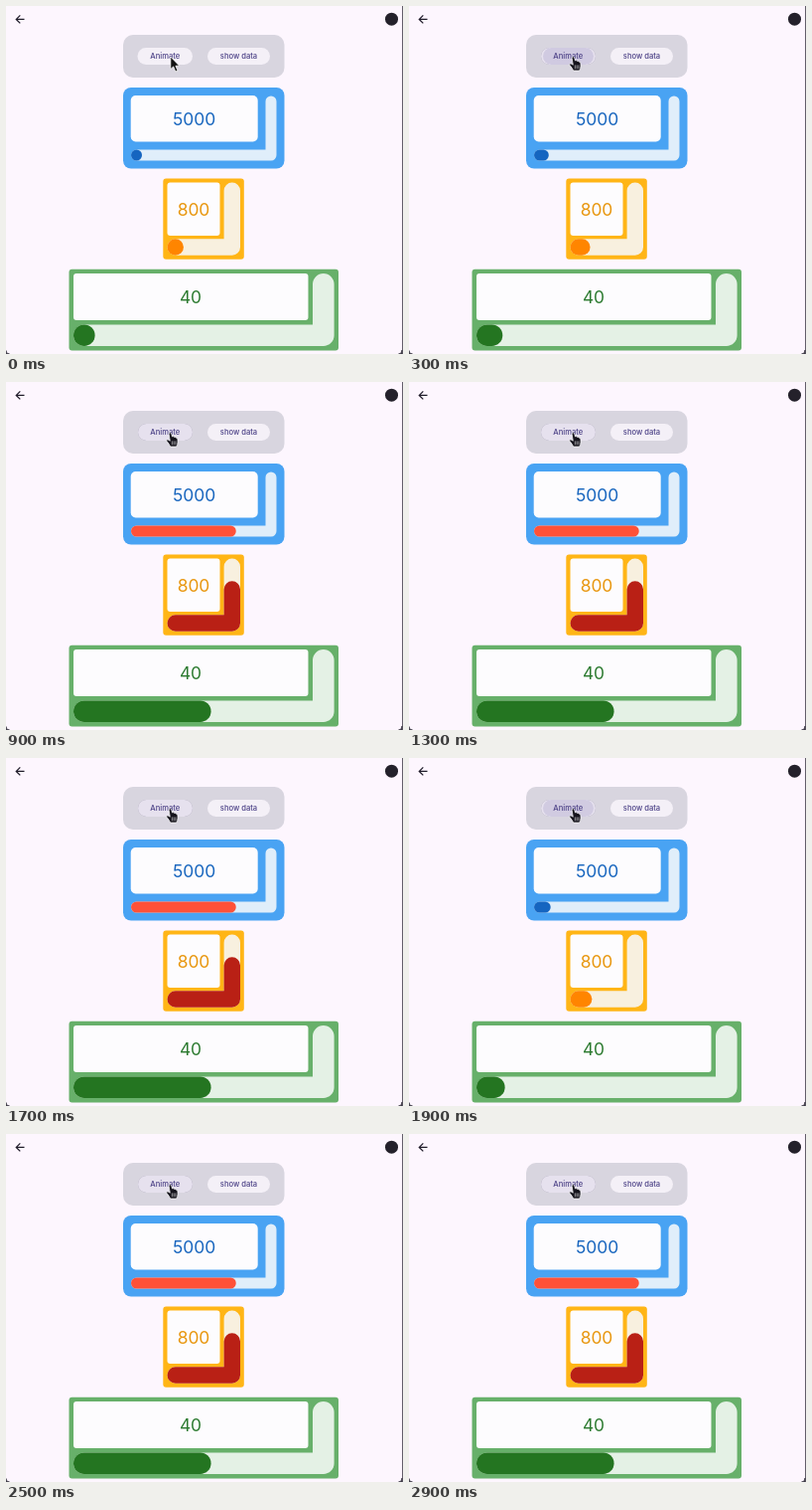
Recreate the animation shown at these times as an HTML page. Size 400 by 350 pixels, loop 3000 ms.

```html
<!DOCTYPE html>
<html lang="en">
<head>
<meta charset="utf-8">
<title>Animated level bars</title>
<style>
  html, body { margin: 0; width: 100%; height: 100%; overflow: hidden; background: #fdf6fe; }
  svg { display: block; width: 400px; height: 350px; }
  text { font-family: Inter, Roboto, sans-serif; text-anchor: middle; }
  .label { font-size: 7.6px; font-weight: 500; fill: #4b4086; }
  .value { font-size: 17.4px; }
  .track, .bar { fill: none; stroke-linecap: round; stroke-linejoin: round; }
  #hover { filter: drop-shadow(0 .8px .7px #77718c99); }
</style>
</head>
<body>
<svg viewBox="0 0 400 350">
  <path d="M399.5 0V350M0 346.5Q0 350 3.5 350H0ZM399 346Q399 350 395.5 350H399Z" fill="#3c3845" stroke="#3c3845" stroke-width=".8"/>
  <path d="M18.5 13.4H10.5M14.3 9.4L10.3 13.4L14.3 17.4" fill="none" stroke="#211d2b" stroke-width="1.3"/>
  <circle cx="388.5" cy="13.2" r="6.5" fill="#24212b"/>

  <rect x="118" y="29" width="162.5" height="43" rx="10" fill="#d8d5df"/>
  <rect x="132.5" y="42" width="55.5" height="17" rx="8.5" fill="#f4f0f7" id="idle"/>
  <g id="hover">
    <rect x="133" y="42" width="55" height="17" rx="8.5" fill="#e6e1ee"/>
    <rect x="135" y="42" width="51" height="17" rx="8.5" fill="#bfb9d8" id="ripple"/>
  </g>
  <rect x="203" y="42" width="63" height="17" rx="8.5" fill="#f4f0f7"/>
  <text class="label" x="160.3" y="53.2">Animate</text>
  <text class="label" x="234.5" y="53.2">show data</text>

  <g id="cards"></g>

  <path id="arrow" d="M165.8 51V63.6L168.7 60.9L170.8 66L173 65.1L170.9 60.2H174.7Z" fill="#111" stroke="#fff" stroke-width=".8"/>
  <g id="hand" stroke-linejoin="round" stroke-linecap="round">
    <path d="M164.2 51.5Q165.6 50 166.6 51.7L167.5 55Q169 54 169.7 55.5Q171 54.8 171.5 56.3Q173 56 173 58V60.5Q173 62.5 171.7 65H165.6Q164.6 62.4 162 59.6Q161 57.8 163 57.8L165 59Z" fill="#15131c" stroke="#fff" stroke-width=".7"/>
    <path d="M167.3 59.8V62.8M169.1 59.8V62.8M170.9 59.8V62.8" stroke="#eee" stroke-width=".6"/>
  </g>
</svg>
<script>
const LOOP = 3000, STEP = 100, DURATION = 500;
const CLICKS = [280, 1870];
const $ = id => document.getElementById(id);

// box and face: x, y, width, height, radius; track: left, bottom, right, top
const cards = [
  { box: [118, 82, 162.5, 81.5, 8], face: [125.7, 90, 128, 46.5, 5], track: [131.5, 150, 267, 96], width: 11,
    fill: '#49a3f3', rail: '#e0eefa', color: '#1565c0', alert: '#ff5138', alertAt: 40,
    level: 50, value: 5000, text: [189.6, 119.8], ink: '#1765be' },
  { box: [158.3, 173.5, 81.5, 81.2, 3], face: [162.5, 177.6, 53, 53.3, 3], track: [170.7, 242.5, 227.8, 185.7], width: 16.4,
    fill: '#ffb516', rail: '#f8f0df', color: '#ff8500', alert: '#b92015', alertAt: 50,
    level: 80, value: 800, text: [189, 210.8], ink: '#e8960d' },
  { box: [63.5, 264.7, 271.5, 81.8, 3], face: [68, 269, 236.5, 47, 3], track: [78.8, 331.2, 319.8, 279.8], width: 21.6,
    fill: '#67b06a', rail: '#e4f1e5', color: '#247521', alert: '#247521', alertAt: 100,
    level: 40, value: 40, text: [186, 298.8], ink: '#2b7a2f' }
];

const rect = ([x, y, w, h, r], fill) =>
  `<rect x="${x}" y="${y}" width="${w}" height="${h}" rx="${r}" fill="${fill}"/>`;

const cardMarkup = c => {
  const [left, bottom, right, top] = c.track;
  const rail = `d="M${left} ${bottom}H${right}V${top}" stroke-width="${c.width}"`;
  return rect(c.box, c.fill) + rect(c.face, '#fdfcfe') +
    `<path class="track" ${rail} stroke="${c.rail}"/>` +
    `<path class="bar" ${rail} pathLength="100"/>` +
    `<text class="value" x="${c.text[0]}" y="${c.text[1]}" fill="${c.ink}">${c.value}</text>`;
};

$('cards').innerHTML = cards.map(cardMarkup).join('');
const bars = document.querySelectorAll('.bar');
const show = (id, visible) => $(id).setAttribute('visibility', visible ? 'visible' : 'hidden');

function draw(now) {
  const t = Math.floor(now % LOOP / STEP) * STEP;
  const click = CLICKS.filter(start => start <= t).pop();
  const elapsed = click === undefined ? 0 : t - click;
  const progress = Math.min(1, elapsed / DURATION);

  cards.forEach((c, i) => {
    const level = c.level * progress;
    bars[i].setAttribute('stroke-dasharray', `${level} 300`);
    bars[i].setAttribute('stroke', level >= c.alertAt ? c.alert : c.color);
  });

  const hovering = t >= STEP;
  show('idle', !hovering);
  show('arrow', !hovering);
  show('hover', hovering);
  show('hand', hovering);
  $('ripple').setAttribute('opacity', elapsed ? Math.max(0, .6 - elapsed / 400) : 0);
  $('ripple').setAttribute('visibility', 'inherit');
}

const began = performance.now();
function tick() {
  draw(performance.now() - began);
  requestAnimationFrame(tick);
}
tick();
</script>
</body>
</html>
```
